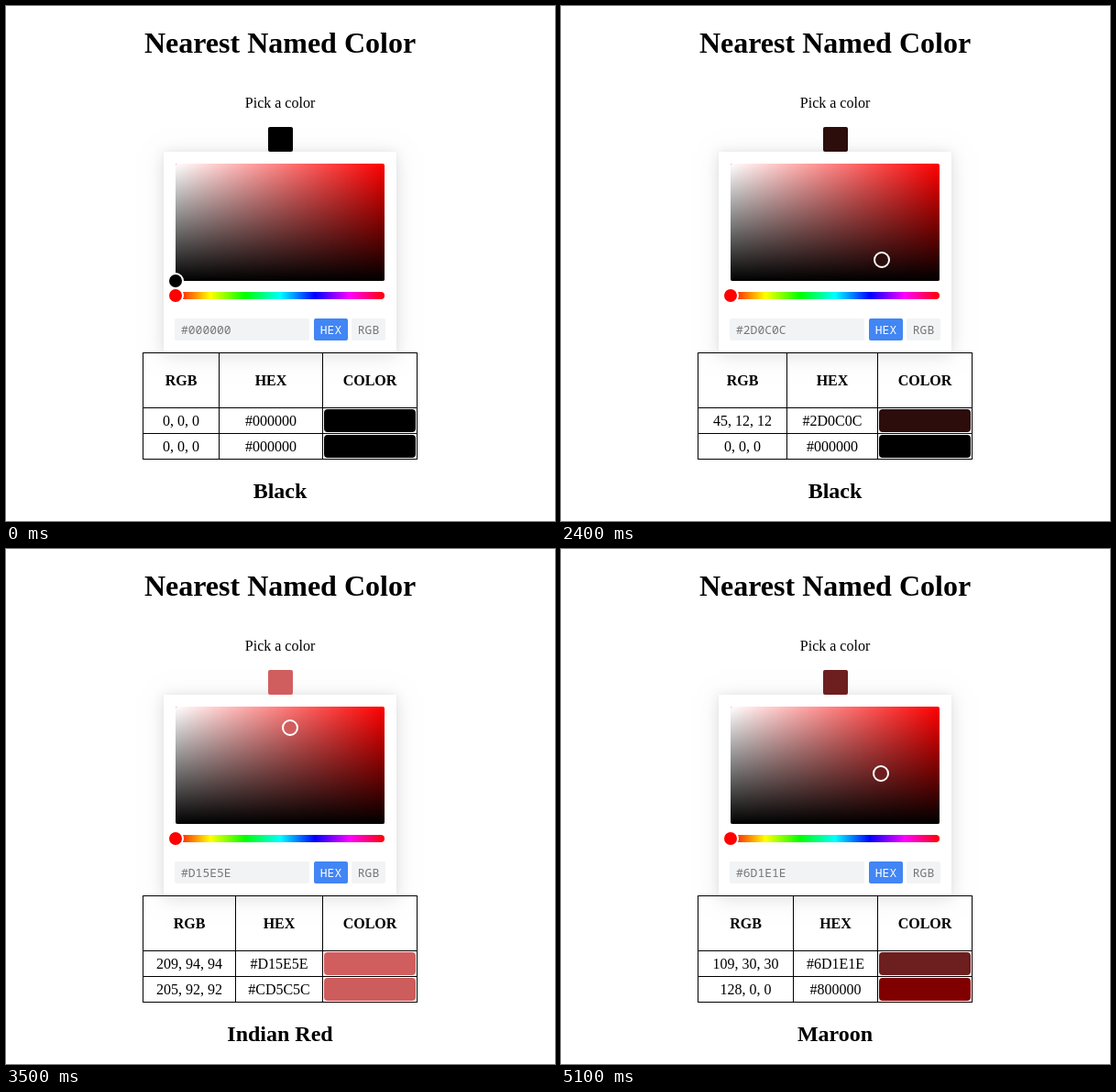
Recreate the animation shown at these times as an HTML page with a canvas. Size 599x562 px, loop 6000 ms.

```html
<!DOCTYPE html>
<html lang="en">
<head>
<meta charset="utf-8">
<title>Nearest Named Color</title>
<style>
html, body { margin: 0; width: 100%; height: 100%; overflow: hidden; background: #fff; }
canvas { display: block; }
</style>
</head>
<body>
<canvas id="stage" width="599" height="562"></canvas>
<script>
const ctx = document.getElementById('stage').getContext('2d');
const LOOP = 6000, STEP = 100;
const SERIF = '"Liberation Serif", "Times New Roman", serif';
const MONO = '"Noto Sans Mono", "DejaVu Sans Mono", monospace';
const FIELD = { x: 185, y: 172, w: 228, h: 128 };

// Picker path: time, x, y
const PATH = [
  [1300, 185, 300], [1400, 185, 296], [1700, 218, 238], [2000, 305, 215],
  [2400, 350, 277], [2700, 385, 235], [3100, 359, 208.6], [3500, 310, 195],
  [3900, 278, 243], [4100, 232, 238], [4200, 240, 262], [4300, 275, 284],
  [4400, 275, 284], [4600, 338, 280], [5100, 349, 245]
];

const parseHex = hex => [1, 3, 5].map(i => parseInt(hex.substr(i, 2), 16));
const toHex = rgb => '#' + rgb.map(v => v.toString(16).padStart(2, '0')).join('').toUpperCase();

const NAMED = ['Black', 'Maroon', 'Dark Red', 'Fire Brick', 'Brown', 'Sienna', 'Saddle Brown',
  'Indian Red', 'Rosy Brown', 'Gray', 'Dim Gray', 'Dark Slate Gray', 'Dark Olive Green', 'Crimson'
].map(name => {
  ctx.fillStyle = name.replace(/ /g, '').toLowerCase();
  return { name, rgb: parseHex(ctx.fillStyle) };
});

function nearest(rgb) {
  const dist = c => c.rgb.reduce((sum, v, i) => sum + (v - rgb[i]) ** 2, 0);
  return NAMED.reduce((a, b) => dist(b) < dist(a) ? b : a);
}

function pointAt(t) {
  if (t <= PATH[0][0]) return PATH[0].slice(1);
  const i = PATH.findIndex(k => k[0] >= t);
  if (i < 0) return PATH[PATH.length - 1].slice(1);
  const a = PATH[i - 1], b = PATH[i], u = (t - a[0]) / (b[0] - a[0]);
  return [a[1] + (b[1] - a[1]) * u, a[2] + (b[2] - a[2]) * u];
}

function colorAt(x, y) {
  const sat = (x - FIELD.x) / FIELD.w;
  const val = 255 * (1 - (y - FIELD.y) / FIELD.h);
  const low = Math.floor(val * (1 - sat));
  return [Math.floor(val), low, low];
}

function box(x, y, w, h, r, fill) {
  ctx.fillStyle = fill;
  ctx.beginPath();
  ctx.roundRect(x, y, w, h, r);
  ctx.fill();
}

function text(str, x, y, font, color = '#000', align = 'center') {
  ctx.font = font;
  ctx.fillStyle = color;
  ctx.textAlign = align;
  ctx.fillText(str, x, y);
}

function thumb(x, y, fill) {
  ctx.beginPath();
  ctx.arc(x, y, 8, 0, 2 * Math.PI);
  ctx.fillStyle = fill;
  ctx.fill();
  ctx.strokeStyle = '#fff';
  ctx.lineWidth = 2;
  ctx.stroke();
}

function ramp(x1, y1, colors) {
  const g = ctx.createLinearGradient(FIELD.x, FIELD.y, x1, y1);
  colors.forEach((c, i) => g.addColorStop(i / (colors.length - 1), c));
  return g;
}

function shadow(blur, dy, alpha) {
  ctx.save();
  ctx.shadowColor = `rgba(0,0,0,${alpha})`;
  ctx.shadowBlur = blur;
  ctx.shadowOffsetY = dy;
  box(172, 159, 254, 219, 0, '#fff');
  ctx.restore();
}

function picker(x, y, color, hex) {
  const { x: fx, y: fy, w, h } = FIELD, right = fx + w, bottom = fy + h;
  shadow(20, 3, 0.12);
  shadow(5, 0, 0.05);
  box(286, 132, 27, 27, 2, color);
  const layers = [
    '#f00',
    ramp(right, fy, ['#fff', 'rgba(255,255,255,0)']),
    ramp(fx, bottom, ['rgba(0,0,0,0)', '#000'])
  ];
  layers.forEach(fill => box(fx, fy, w, h, 2, fill));
  box(fx, 312, w, 8, 4, ramp(right, fy, ['#f00', '#ff0', '#0f0', '#0ff', '#00f', '#f0f', '#f00']));
  thumb(fx, 316, '#f00');
  thumb(Math.floor(x), Math.floor(y), color);
  const font = '13px ' + MONO;
  box(184, 341, 147, 24, 2, '#f1f3f4');
  text(hex, 191, 358, font, '#777', 'left');
  box(336, 341, 37, 24, 2, '#4285f4');
  text('HEX', 354.5, 358, font, '#fff');
  box(377, 341, 37, 24, 2, '#f1f3f4');
  text('RGB', 395.5, 358, font, '#777');
}

function table(colors) {
  const left = 149.5, mid2 = 345.5, right = 448.5, top = 378.5, bottom = 494.5;
  const font = '16px ' + SERIF, bold = 'bold ' + font;
  const rows = colors.map(rgb => [rgb.join(', '), toHex(rgb)]);
  // The first two columns share their space by content width.
  ctx.font = font;
  const [w1, w2] = [0, 1].map(c => 3 + Math.max(...rows.map(r => ctx.measureText(r[c]).width)));
  const mid1 = left + Math.round((mid2 - left) * w1 / (w1 + w2));
  const c1 = (left + mid1) / 2, c2 = (mid1 + mid2) / 2;

  ctx.beginPath();
  [left, mid1, mid2, right].forEach(x => { ctx.moveTo(x, top - 0.5); ctx.lineTo(x, bottom + 0.5); });
  [top, 438.5, 466.5, bottom].forEach(y => { ctx.moveTo(left, y); ctx.lineTo(right, y); });
  ctx.strokeStyle = '#000';
  ctx.lineWidth = 1;
  ctx.stroke();

  text('RGB', c1, 414, bold);
  text('HEX', c2, 414, bold);
  text('COLOR', 397, 414, bold);
  rows.forEach(([rgb, hex], i) => {
    const y = 440 + 28 * i;
    text(rgb, c1, y + 18, font);
    text(hex, c2, y + 18, font);
    box(347, y, 100, 25, 4, hex);
  });
}

function draw(t) {
  const [x, y] = pointAt(Math.floor(t / STEP) * STEP);
  const rgb = colorAt(x, y), hex = toHex(rgb), match = nearest(rgb);
  ctx.fillStyle = '#fff';
  ctx.fillRect(0, 0, 599, 562);
  text('Nearest Named Color', 299, 51, 'bold 32px ' + SERIF);
  text('Pick a color', 299, 111, '16px ' + SERIF);
  picker(x, y, hex, hex);
  table([rgb, match.rgb]);
  text(match.name, 299, 537, 'bold 24px ' + SERIF);
}

const start = performance.now();
function tick() {
  draw((performance.now() - start) % LOOP);
  requestAnimationFrame(tick);
}
tick();
</script>
</body>
</html>
```
